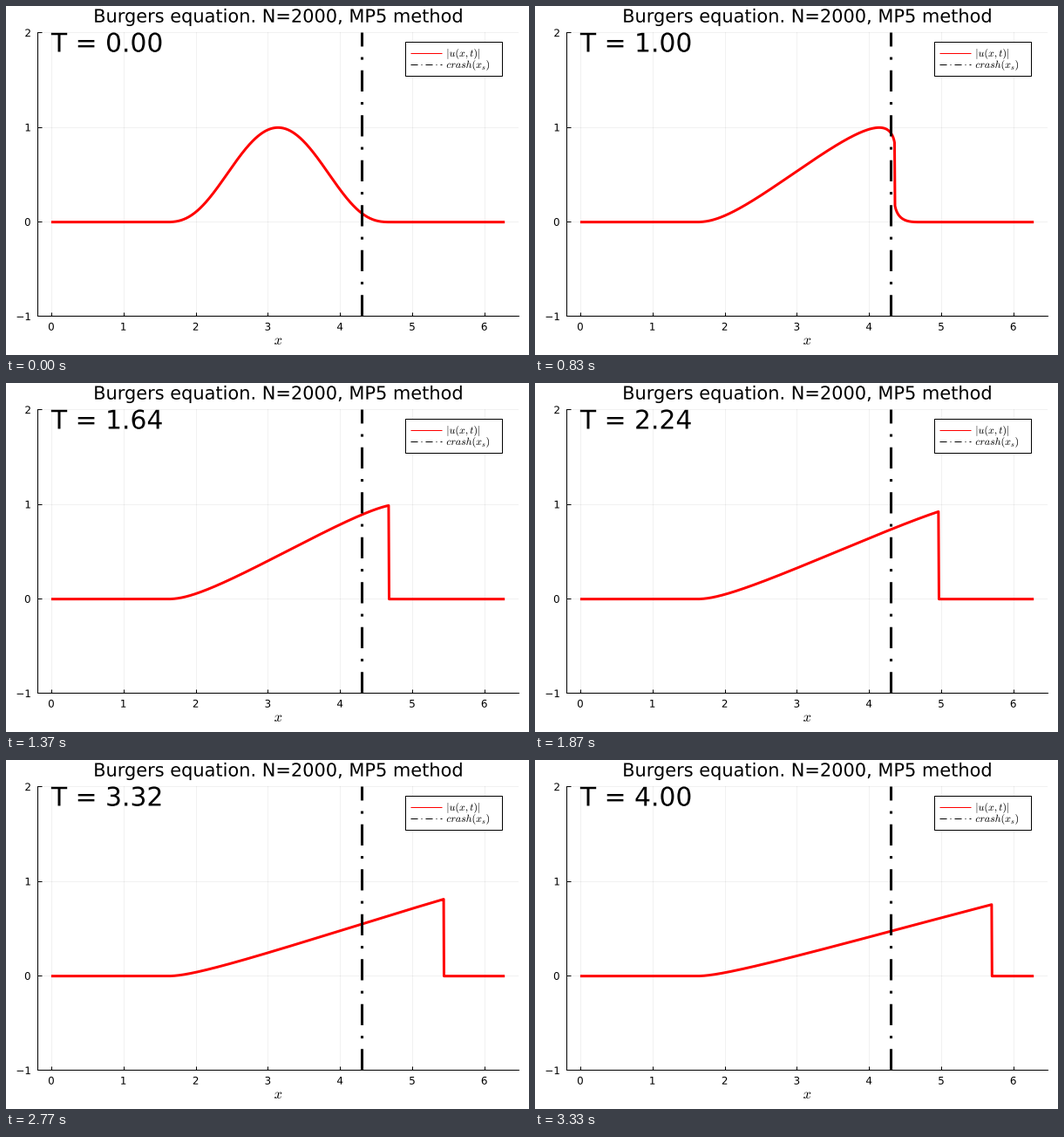
These frames come from a looping animation (600x400 px, 3360 ms). A matplotlib script:

```python
import numpy as np
import matplotlib.pyplot as plt
from matplotlib.animation import FuncAnimation
from matplotlib.patches import PathPatch, Rectangle
from matplotlib.textpath import TextPath
from matplotlib.transforms import Affine2D

W, H, DPI = 600, 400, 100
PX = 72 / DPI                      # points per pixel
TICK_MS, LOOP_MS = 10, 3360
STEPS, DT = 101, 0.04
HALF = np.pi / 2                   # half width of the initial pulse
DASH_DOT = (0, (8, 4, 1, 4))

plt.rcParams.update({"font.family": "DejaVu Sans", "mathtext.fontset": "cm"})


def pulse(x):
    z = (x - np.pi) / HALF
    return np.clip(1 - z**2, 0, None) ** 3


def pulse_integral(x):
    z = np.clip((x - np.pi) / HALF, -1, 1)
    return HALF * (z - z**3 + 0.6 * z**5 - z**7 / 7)


# Entropy solution of u_t + u u_x = 0 by the Hopf-Lax formula:
# each x picks the characteristic foot with the least action.
grid = np.linspace(0, 2 * np.pi, 1001)
feet = np.linspace(0, 2 * np.pi, 2001)
distance = (grid[:, None] - feet) ** 2 / 2
potential = pulse_integral(feet)


def burgers(t):
    foot = feet[np.argmin(distance + t * potential, axis=1)]
    u = pulse(foot)
    return foot + t * u, u


curves = [burgers(k * DT) for k in range(STEPS)]

fig = plt.figure(figsize=(W / DPI, H / DPI), dpi=DPI, facecolor="white")

left, right, top, bottom = 36.3, 587.8, 30.45, 355.45
ax = fig.add_axes([left / W, 1 - bottom / H,
                   (right - left) / W, (bottom - top) / H])
margin = 0.03 * 2 * np.pi
ax.set_xlim(-margin, 2 * np.pi + margin)
ax.set_ylim(-1, 2)
ax.set_xticks(range(7))
ax.set_yticks(range(-1, 3))
ax.spines[["top", "right"]].set_visible(False)
ax.spines[["left", "bottom"]].set_linewidth(PX)
ax.tick_params(direction="in", length=4.5 * PX, width=PX,
               labelbottom=False, labelleft=False)
ax.grid(color="black", alpha=0.055, linewidth=PX)
ax.set_axisbelow(True)

# The curve sits half a pixel below the grid
wave, = ax.plot([], [], color="red", lw=3 * PX, solid_capstyle="butt",
                solid_joinstyle="round", clip_on=False, zorder=3,
                transform=ax.transData + Affine2D().translate(0, -0.55))
ax.plot([4.3, 4.3], [-1, 2], color="black", lw=3.03 * PX, ls=DASH_DOT,
        dash_capstyle="butt", zorder=4)

# Overlay in pixels for text and legend
overlay = fig.add_axes([0, 0, 1, 1])
overlay.set_xlim(0, W)
overlay.set_ylim(0, H)
overlay.axis("off")


def glyphs(x, y, text, size, align=0.0):
    """Outline of text with baseline y from the top; align 0 left to 1 right."""
    if align:
        box = TextPath((0, 0), text, size=size).get_extents()
        x -= box.x0 + align * box.width
    return TextPath((x, H - y), text, size=size)


def label(*args):
    patch = PathPatch(glyphs(*args), fc="black", lw=0)
    return overlay.add_patch(patch)


label(312.5, 18.7, "Burgers equation. N=2000, MP5 method", 20.9, 0.5)
label(312.2, 388, "$x$", 16.4, 0.5)
clock = label(51.9, 52.5, "T", 29.8)

unit_x = (right - left) / (2 * np.pi + 2 * margin)
unit_y = (bottom - top) / 3
for n in range(7):
    label(left + (n + margin) * unit_x, 371.7, str(n), 11.9, 0.5)
for n in range(-1, 3):
    text = str(n).replace("-", "\N{MINUS SIGN}")
    label(27.8, bottom - (n + 1) * unit_y + 4.7, text, 11.9, 1)

overlay.add_patch(Rectangle((458, H - 80), 111, 39, fc="white", ec="black",
                            lw=PX))
for y, color, style, text in ((54, "red", "-", "$|u(x,t)|$"),
                              (67, "black", DASH_DOT, "$crash(x_s)$")):
    overlay.plot([464, 500], [H - y, H - y], color=color, lw=PX, ls=style,
                 solid_capstyle="butt", dash_capstyle="butt")
    label(505.3, y + 3.9, text, 11.9).set_zorder(3)


def update(tick):
    step = (3 * tick + 1) // 10    # 30 steps per second on a 10 ms clock
    wave.set_data(*curves[step])
    clock.set_path(glyphs(51.9, 52.5, f"T = {step * DT:.2f}", 29.8))
    return wave, clock


anim = FuncAnimation(fig, update, frames=LOOP_MS // TICK_MS,
                     interval=TICK_MS, repeat=True, repeat_delay=0)
plt.show()
```
